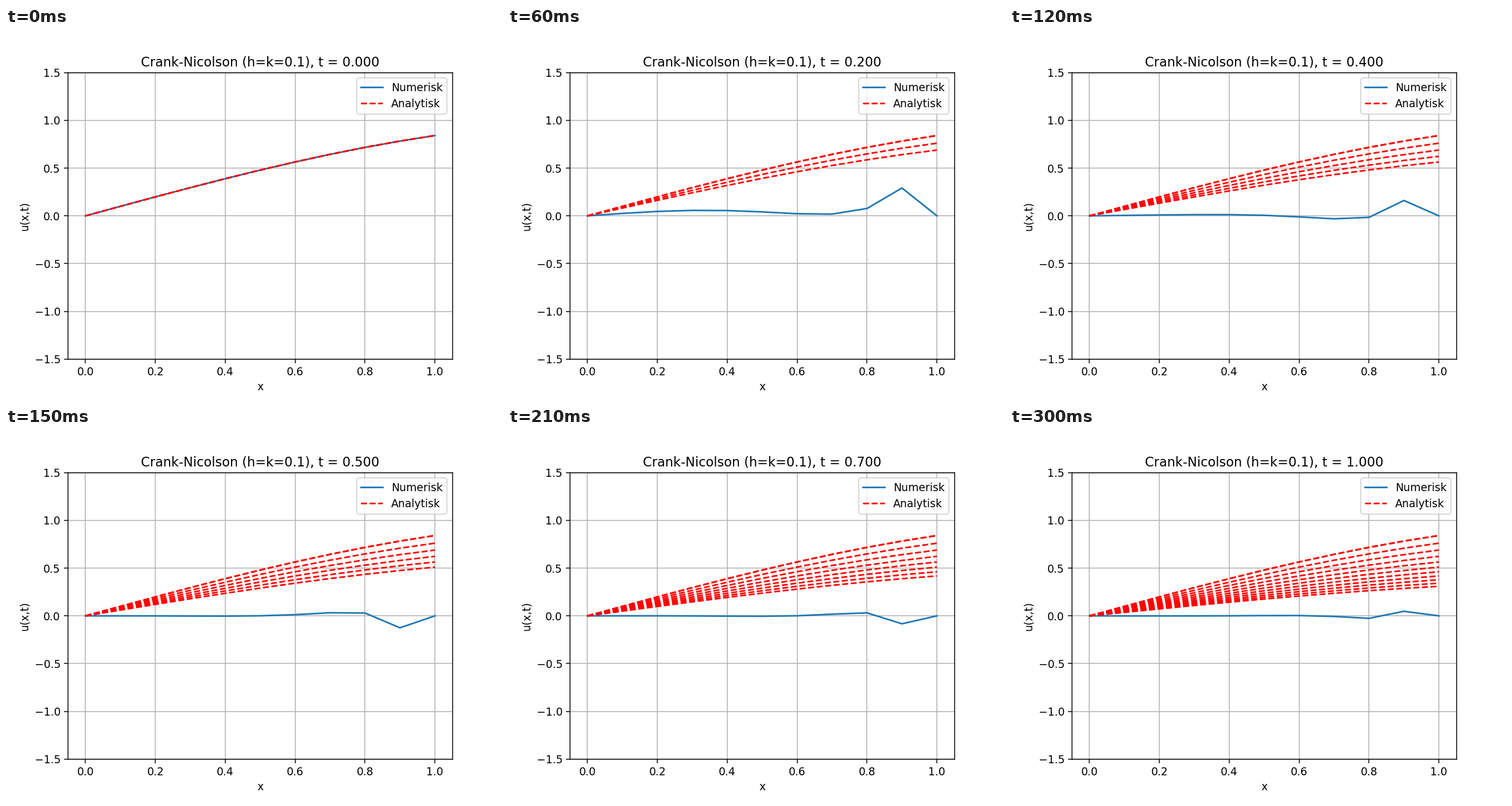
These frames come from a looping animation (864x648 px, 330 ms). A matplotlib script:

```python
import numpy as np
import matplotlib.pyplot as plt
from matplotlib.animation import FuncAnimation

H = K = 0.1
STEPS = 10

x = np.linspace(0, 1, 11)


def exact(t):
    return np.exp(-t) * np.sin(x)


def crank_nicolson():
    """Heat equation with zero boundary values, started from sin(x)."""
    n = len(x) - 2
    r = K / H**2
    lap = -2 * np.eye(n) + np.eye(n, k=1) + np.eye(n, k=-1)
    step = np.linalg.solve(np.eye(n) - r / 2 * lap, np.eye(n) + r / 2 * lap)
    u = np.zeros((STEPS + 1, len(x)))
    u[0] = np.sin(x)
    for i in range(STEPS):
        u[i + 1, 1:-1] = step @ u[i, 1:-1]
    return u


u = crank_nicolson()

fig, ax = plt.subplots(figsize=(6.4, 4.8), dpi=135)
numeric, = ax.plot(x, u[0], label="Numerisk")
# The starting curve is drawn twice, which makes it look heavier.
ax.plot(x, exact(0), "r--", label="Analytisk")
trail = [ax.plot(x, exact(i * K), "r--")[0] for i in range(STEPS + 1)]

ax.set_xlim(-0.05, 1.05)
ax.set_ylim(-1.5, 1.5)
ax.set_xlabel("x")
ax.set_ylabel("u(x,t)")
ax.grid(True)
ax.legend(loc="upper right")
title = ax.set_title("")


def update(frame):
    numeric.set_ydata(u[frame])
    for i, line in enumerate(trail):
        line.set_visible(i <= frame)
    title.set_text(f"Crank-Nicolson (h=k=0.1), t = {frame * K:.3f}")
    return [numeric, title, *trail]


anim = FuncAnimation(fig, update, frames=STEPS + 1, interval=30,
                     repeat=True, repeat_delay=0, blit=False)
plt.show()
```
